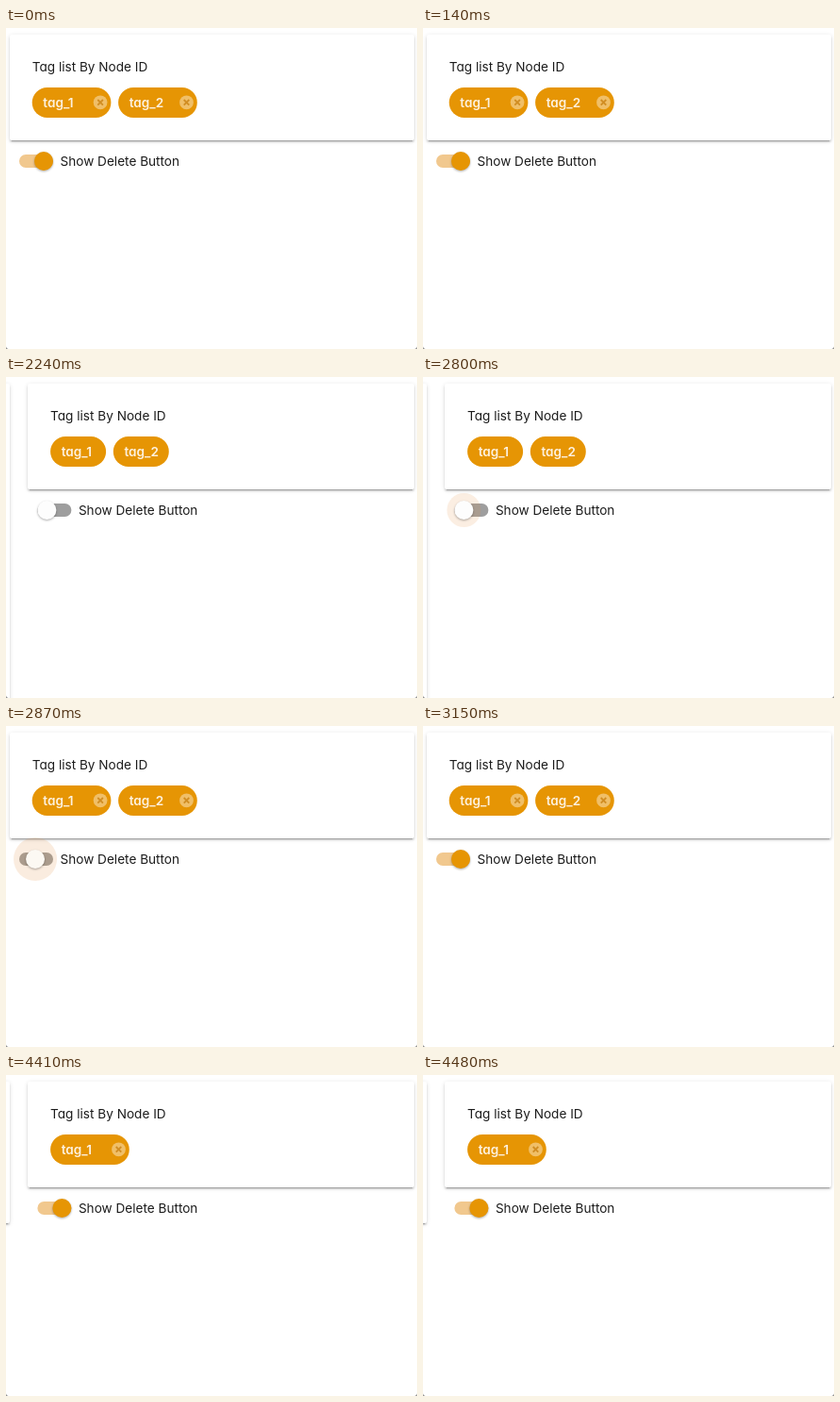
These frames come from a looping animation (436x340 px, 6860 ms). An HTML page:

```html
<!DOCTYPE html>
<html lang="en">
<head>
<meta charset="utf-8">
<title>Tag list</title>
<style>
  html, body { margin: 0; width: 100%; height: 100%; overflow: hidden; background: #fff; }
  .stage { position: relative; width: 436px; height: 340px; overflow: hidden; }
  .card {
    position: absolute; top: 7px; background: #fff; border-radius: 2px;
    box-shadow: 0 3px 1px -2px rgba(0,0,0,.2), 0 2px 2px rgba(0,0,0,.14), 0 1px 5px rgba(0,0,0,.12);
  }
  #panel { left: -60px; width: 63.5px; }
  #card { right: 3.5px; height: 112px; }
  svg { position: absolute; left: 0; top: 0; }
  /* cv11 selects the single-storey a */
  text { font: 13.6px Inter, "Open Sans", sans-serif; font-feature-settings: "cv11"; fill: #1c1c1c; }
  .chip text { font-weight: 600; fill: #fdf1de; }
  .body, #track { filter: blur(.3px); }
  .icon { fill: #fff; }
  .cross { stroke: #d18d22; stroke-width: 1.8; }
  #thumb { filter: blur(.3px) drop-shadow(0 1px 1px rgba(0,0,0,.32)); }
</style>
</head>
<body>
<div class="stage">
  <div class="card" id="panel"></div>
  <div class="card" id="card"></div>
  <svg width="436" height="340" viewBox="0 0 436 340">
    <defs>
      <clipPath id="chipShape"><rect x="0" y="63" width="84" height="32" rx="16"/></clipPath>
    </defs>
    <path d="M0 337.5V340H2.5Q.5 339.5 0 337.5ZM436 337.5V340H433.5Q435.5 339.5 436 337.5Z" fill="#8a8a8a"/>
    <g id="content">
      <text x="27.7" y="46">Tag list By Node ID</text>
      <g id="chips"></g>
      <rect id="track" x="14" y="134" width="36" height="14" rx="7"/>
      <circle id="ripple" cy="141" fill="#e08a3c"/>
      <circle id="thumb" cy="141" r="10"/>
      <text x="57.5" y="146">Show Delete Button</text>
    </g>
  </svg>
</div>
<script>
const LOOP = 6860, SHIFT = 19.4;
const ACCENT = [230, 149, 4];
const $ = id => document.getElementById(id);

const rest = {
  shifted: false, panelHeight: 400, closable: true, tags: 2,
  slide: 1, tint: 1, radius: 0, glow: 0, hover: false, focus: false
};

// Each step holds until the next one; omitted values are at rest.
const off = { shifted: true, closable: false, slide: 0, tint: 0 };
const steps = [
  [0, {}],
  [1960, { radius: 18, glow: .15 }],
  [2030, { ...off, slide: .45, tint: .5, radius: 23, glow: .15 }],
  [2100, { ...off, radius: 23, glow: .05 }],
  [2240, off],
  [2800, { ...off, radius: 18, glow: .15 }],
  [2870, { slide: .44, tint: .04, radius: 23, glow: .16 }],
  [2940, { slide: .92, tint: .45, radius: 23, glow: .15 }],
  [3010, { tint: .75, radius: 23, glow: .1 }],
  [3080, { tint: .95, radius: 23, glow: .05 }],
  [3150, {}],
  [3850, { hover: true }],
  [4130, { hover: true, focus: true }],
  [4270, { shifted: true, panelHeight: 150, tags: 1 }]
];

const mix = (from, to, k) => `rgb(${from.map((v, i) => Math.round(v + (to[i] - v) * k))})`;

function set(node, attrs) {
  for (const key in attrs) node.setAttribute(key, attrs[key]);
}

function chip(x, label, state, last) {
  const width = state.closable ? 83.7 : 59;
  const opacity = last && state.hover ? .47 : .4;
  const close = `<circle class="icon" cx="72.4" cy="78.8" r="7.4" opacity="${opacity}"/>
    <path class="cross" d="M69.6 76l5.6 5.6m0-5.6l-5.6 5.6"/>`;
  const ring = `<rect x="55.2" y="67.4" width="27.4" height="25" rx="2.5" fill="none"
    stroke="#8e9090" stroke-width="3" clip-path="url(#chipShape)"/>`;
  return `<g class="chip" transform="translate(${x})">
    <rect class="body" y="63" width="${width}" height="32" rx="16" fill="rgb(${ACCENT})"/>
    <text x="11.6" y="84">${label}</text>
    ${state.closable ? close : ''}${last && state.focus ? ring : ''}</g>`;
}

function render(state) {
  $('card').style.left = (state.shifted ? 23 : 4) + 'px';
  $('panel').style.height = state.panelHeight + 'px';
  $('panel').style.display = state.shifted ? 'block' : 'none';
  set($('content'), { transform: `translate(${state.shifted ? SHIFT : 0})` });

  const pitch = state.closable ? 91.4 : 66.7;
  $('chips').innerHTML = Array.from({ length: state.tags }, (_, i) =>
    chip(27.7 + i * pitch, `tag_${i + 1}`, state, i === 1)).join('');

  const cx = 24 + 16 * state.slide;
  set($('track'), { fill: mix([158, 158, 158], [241, 200, 142], state.tint) });
  set($('ripple'), { cx, r: state.radius, opacity: state.glow });
  set($('thumb'), { cx, fill: mix([253, 253, 253], ACCENT, state.tint) });
}

let shown;
function frame(now) {
  const time = now % LOOP;
  const step = steps.findLast(([start]) => start <= time);
  if (step !== shown) {
    shown = step;
    render({ ...rest, ...step[1] });
  }
  requestAnimationFrame(frame);
}
frame(0);
</script>
</body>
</html>
```
